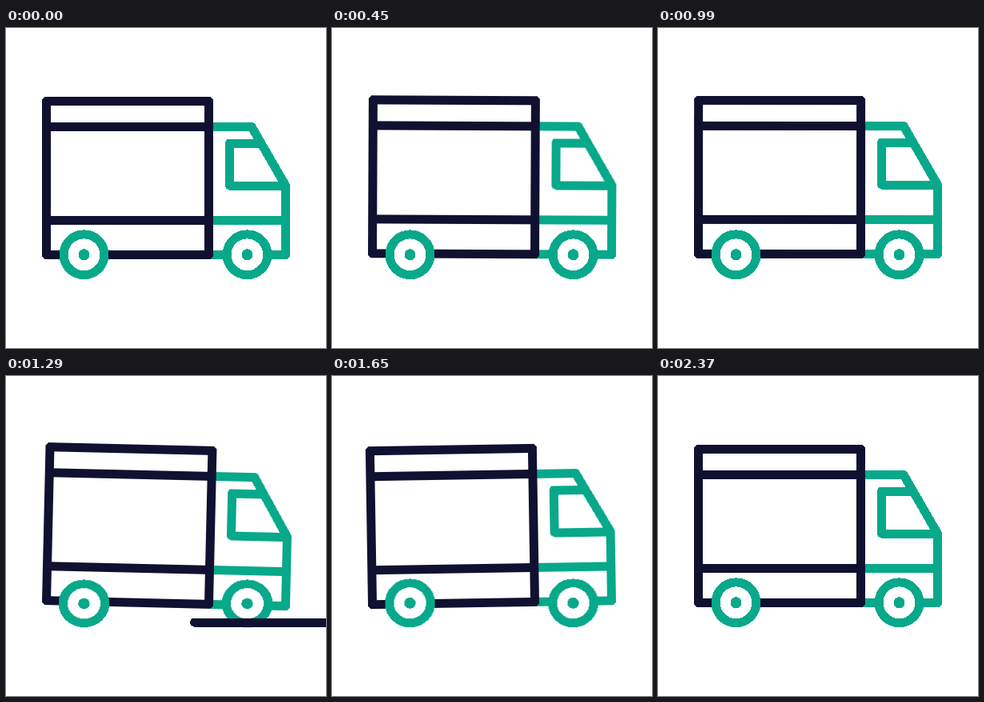
Animation, 400 px wide and 400 px high, one loop 4460 ms. Source, as an HTML page:

```html
<!DOCTYPE html>
<html lang="en">
<head>
<meta charset="utf-8">
<title>Delivery truck</title>
<style>
  :root {
    --navy: #101130;
    --teal: #08a88a;
    --loop: 4460ms;
    --sine: cubic-bezier(.37, 0, .63, 1);
  }
  html, body { margin: 0; width: 100%; height: 100%; overflow: hidden; background: #fff; }
  svg { display: block; width: 100%; height: 100%; shape-rendering: crispEdges; }

  .navy, .teal {
    fill: none;
    stroke-width: 11;
    stroke-linecap: round;
    stroke-linejoin: round;
  }
  .navy { stroke: var(--navy); }
  .teal { stroke: var(--teal); }
  .tyre { fill: #fff; }
  .hub { fill: var(--teal); }

  .bounce { animation: bounce var(--loop) var(--sine) infinite; }
  .rock { transform-origin: 200px 283px; animation: rock var(--loop) var(--sine) infinite; }
  .wheel { animation: squash var(--loop) var(--sine) infinite; }
  .rear { transform-origin: 97.5px 314px; }
  .front { transform-origin: 301.5px 314px; }

  .road { animation: pass var(--loop) linear infinite backwards; }
  .second { animation-delay: 570ms; }
  .third { animation-delay: 1140ms; }

  @keyframes rock {
    0%, 52.47%, 100% { transform: rotate(0deg); }
    5.16%, 28.25% { transform: rotate(1.35deg); }
    16.26%, 39.69% { transform: rotate(-1.26deg); }
  }
  @keyframes bounce {
    0%, 52.47%, 100% { transform: translateY(0); }
    5.16%, 16.26%, 28.25%, 39.69% { transform: translateY(.7px); }
    10.99%, 22.2%, 34.53% { transform: translateY(-1px); }
    46% { transform: translateY(-.4px); }
  }
  @keyframes squash {
    0%, 10.99%, 22.2%, 34.53%, 46%, 100% { transform: scale(1); }
    5.16%, 16.26%, 28.25%, 39.69% { transform: scale(1.03, .963); }
  }
  @keyframes pass {
    0%, 1.345% { transform: translateX(407.5px); }
    8.969%, 100% { transform: translateX(-255.5px); }
  }
</style>
</head>
<body>
<svg viewBox="0 0 400 400">
  <g class="bounce">
    <g class="rock">
      <path class="teal" d="M253.5 123.5H307L349.5 197V283.5H253.5M253.5 240H349.5M318 144H279.5V197H349.5"/>
      <path class="navy" d="M50.5 91.5H253.5V283.5H50.5ZM50.5 123.5H253.5M50.5 240H253.5"/>
    </g>
  </g>

  <g class="wheel rear">
    <circle class="teal tyre" cx="97.5" cy="283.3" r="25.4"/>
    <circle class="hub" cx="97.5" cy="283.3" r="7"/>
  </g>
  <g class="wheel front">
    <circle class="teal tyre" cx="301.5" cy="283.3" r="25.4"/>
    <circle class="hub" cx="301.5" cy="283.3" r="7"/>
  </g>

  <path class="navy road" d="M5.5 308H229.5"/>
  <path class="navy road second" d="M5.5 308H229.5"/>
  <path class="navy road third" d="M5.5 308H229.5"/>
</svg>
</body>
</html>
```
